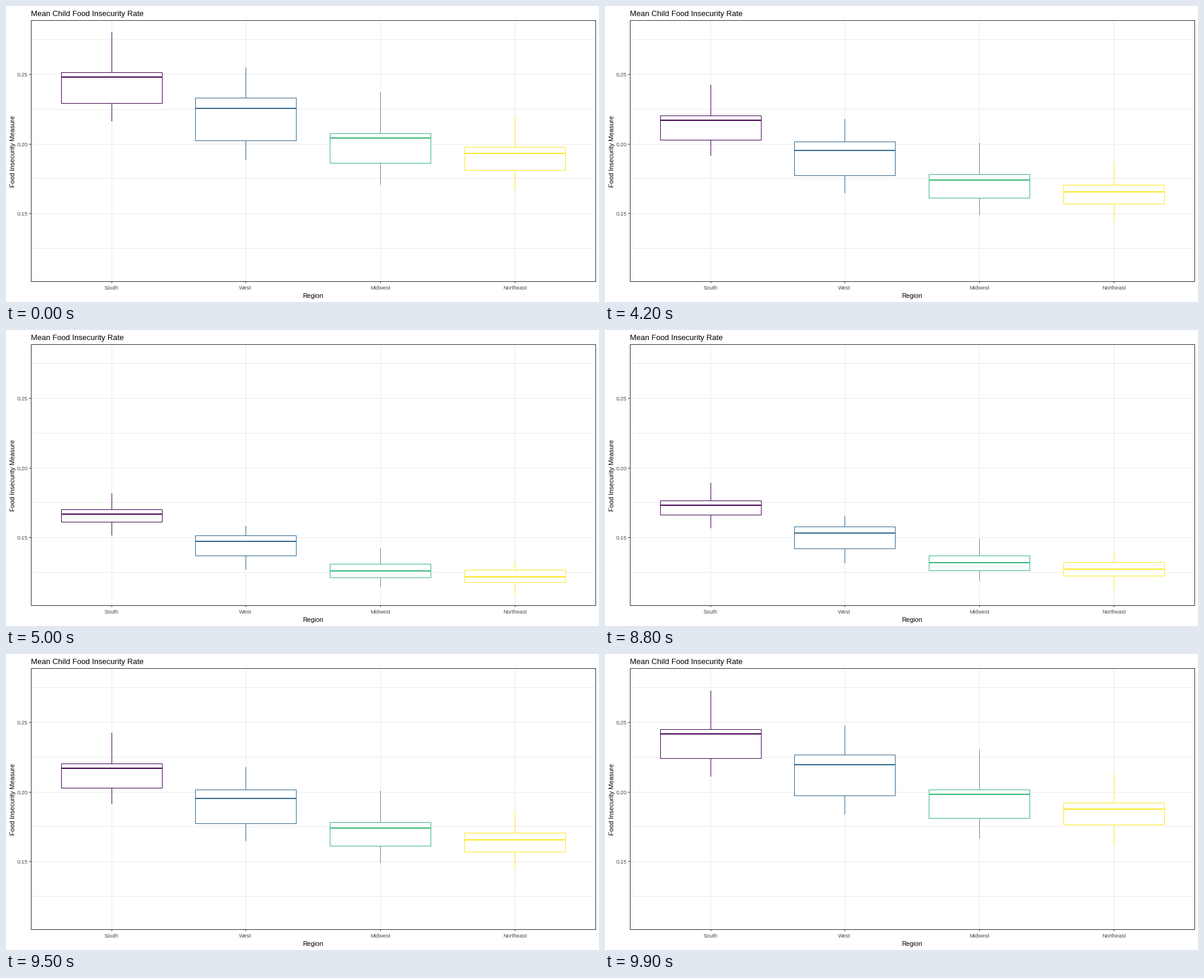
A matplotlib script that plays this animation: 1000 by 500 pixels, repeating every 10 s.

```python
import numpy as np
import matplotlib.pyplot as plt
from matplotlib.animation import FuncAnimation
from matplotlib.patches import Rectangle

WIDTH, HEIGHT = 1000, 500
FRAMES, INTERVAL = 100, 100
STEPS = 13                      # frames needed to morph between two states
LEAVE_FIRST, LEAVE_SECOND = 37, 87
LEFT, RIGHT, TOP, BOTTOM = 42, 994, 24, 465
BOX_WIDTH = 170
TITLES = "Mean Child Food Insecurity Rate", "Mean Food Insecurity Rate"

# name, centre x, box left, colour, whisker colour,
# then rows of (max, upper quartile, median, lower quartile, min) per state
REGIONS = [
    ("South", 178, 93, "#440154", "#440154",
     (44, 112, 120, 164, 194), (276, 303, 311, 324, 346)),
    ("West", 404, 319, "#31688e", "#31688e",
     (104, 155, 173, 227, 259), (331, 347, 357, 381, 404)),
    ("Midwest", 631, 546, "#35b779", "#70877c",
     (145, 215, 223, 265, 301), (369, 395, 407, 418, 433)),
    ("Northeast", 858, 773, "#fde725", "#fde725",
     (185, 238, 249, 277, 310), (392, 405, 417, 426, 447)),
]

plt.rcParams["font.family"] = "Liberation Sans"
fig = plt.figure(figsize=(WIDTH / 72, HEIGHT / 72), dpi=72, facecolor="white")
ax = fig.add_axes([0, 0, 1, 1])
ax.set_xlim(0, WIDTH)
ax.set_ylim(HEIGHT, 0)
ax.axis("off")


def line(xs, ys, color, width=1, z=1):
    return ax.plot(xs, ys, color=color, lw=width, zorder=z, snap=False,
                   solid_capstyle="butt")[0]


def frame_box(x, y, w, h, color, fill, z):
    return ax.add_patch(Rectangle((x + 0.5, y + 0.5), w, h, ec=color, fc=fill,
                                  lw=1, zorder=z, snap=False))


def label(x, y, text, size, color="black", ha="center", **kw):
    return ax.text(x, y, text, size=size, color=color, ha=ha,
                   va="baseline", zorder=6, **kw)


def draw_panel():
    for y in (56, 115, 174, 233, 291, 350, 409):
        line([LEFT, RIGHT], [y + 0.5] * 2, "#ebebeb")
    for y, text in ((115, "0.25"), (233, "0.20"), (350, "0.15")):
        line([LEFT - 3, LEFT], [y + 0.5] * 2, "#333333", z=5)
        label(37, y + 4, text, 9.2, "#4d4d4d", "right")
    for name, x, *_ in REGIONS:
        line([x + 0.5] * 2, [TOP, BOTTOM], "#ebebeb")
        line([x + 0.5] * 2, [BOTTOM, BOTTOM + 3], "#333333", z=5)
        label(x, 479, name, 9.2, "#4d4d4d")
    frame_box(LEFT, TOP, RIGHT - LEFT, BOTTOM - TOP, "#333333", "none", 5)
    label(517.5, 493, "Region", 11)
    ax.text(15, 245, "Food Insecurity Measure", size=11, rotation=90,
            ha="right", va="center", zorder=6).set(
                va="center", ha="left", rotation_mode="anchor",
                position=(15, 306))
    ax.texts[-1].set_va("baseline")


class BoxGlyph:
    def __init__(self, x, left, color, whisker_color, first, second):
        self.first, self.second = np.array(first), np.array(second)
        self.whisker = line([x + 0.5] * 2, [0, 0], whisker_color, z=2)
        self.box = frame_box(left, 0, BOX_WIDTH, 0, color, "white", 3)
        self.median = line([left, left + BOX_WIDTH + 1], [0, 0], color, 2, 4)

    def pose(self, mix):
        rows = self.first + (self.second - self.first) * mix
        top, upper, median, lower, bottom = np.floor(rows + 0.5)
        self.whisker.set_ydata([top, bottom + 1])
        self.box.set_y(upper + 0.5)
        self.box.set_height(lower - upper)
        self.median.set_ydata([median, median])


def state_mix(frame):
    """0 shows the first state, 1 the second, linear in between."""
    there = np.clip((frame - LEAVE_FIRST) / STEPS, 0, 1)
    back = np.clip((frame - LEAVE_SECOND) / STEPS, 0, 1)
    return there - back


draw_panel()
glyphs = [BoxGlyph(*region[1:]) for region in REGIONS]
title = label(42, 17, TITLES[0], 13, ha="left")


def update(frame):
    mix = state_mix(frame)
    for glyph in glyphs:
        glyph.pose(mix)
    title.set_text(TITLES[int(mix > 0.5)])
    return []


animation = FuncAnimation(fig, update, frames=FRAMES, interval=INTERVAL,
                          repeat=True, repeat_delay=0, blit=False)
plt.show()
```
